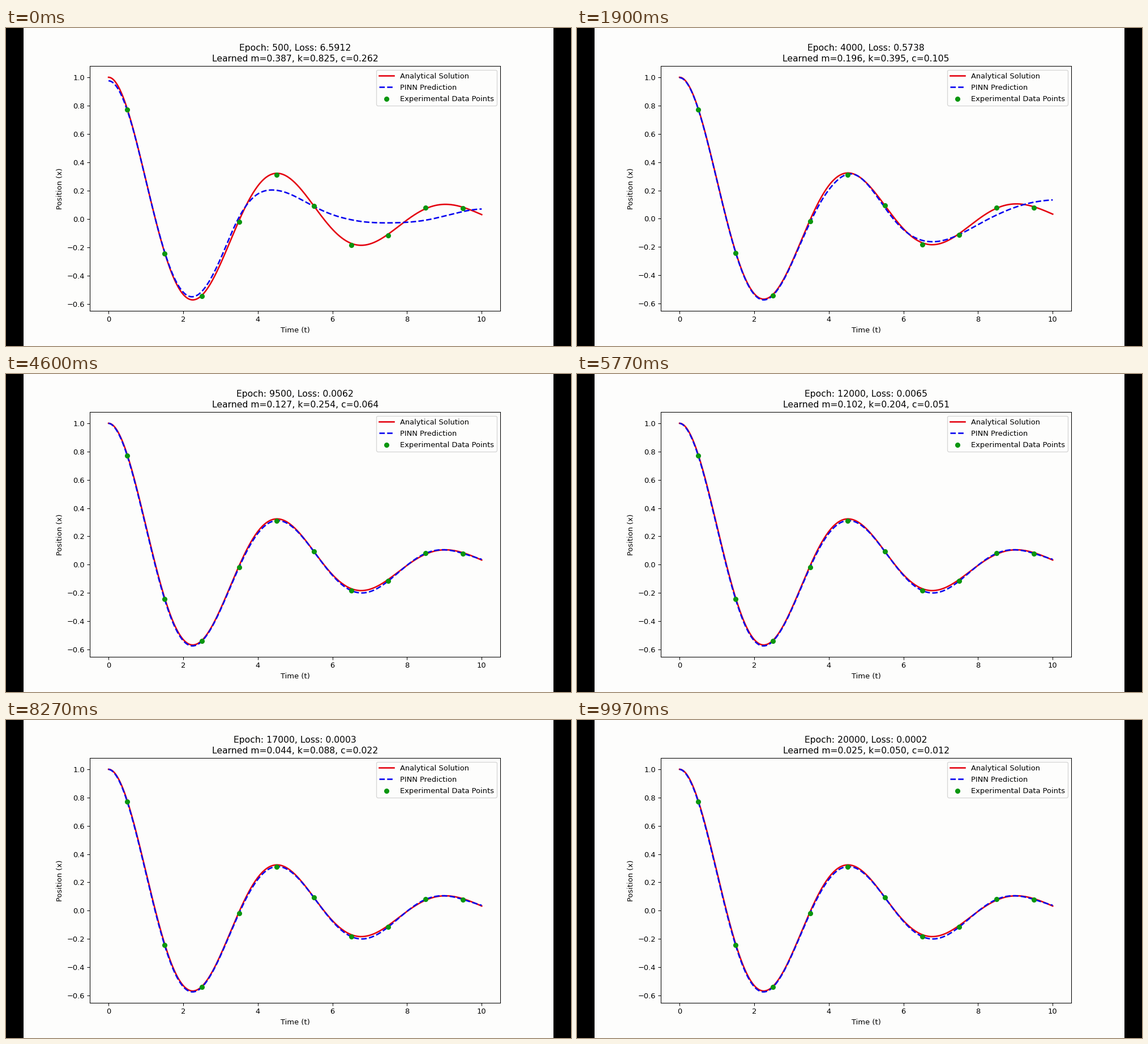
Write a matplotlib script that moves like this. It is 998 px wide and 561 px high and loops after 10 s.

```python
import numpy as np
import matplotlib.pyplot as plt
from matplotlib.animation import FuncAnimation
from matplotlib.patches import Rectangle

W, H, DPI = 998, 561, 93.5
PAGE_X, PAGE_W = 31.2, 935.6
STEPS, STEP_MS = 40, 250
PAGE, RED, BLUE, GREEN = "#fdfdfc", "#e4000f", "#0500f0", "#0a960f"

plt.rcParams["font.family"] = "DejaVu Sans"


def damped(t, decay=0.25, stiffness=2.0):
    """Free oscillation released from x = 1 at rest."""
    w = np.sqrt(stiffness - decay ** 2)
    return np.exp(-decay * t) * (np.cos(w * t) + decay / w * np.sin(w * t))


def bias(t):
    """Small error that remains once the network has converged."""
    ripple = 0.0013 * t * np.cos(2 * np.pi * (t - 5.5) / 2.85)
    return ripple - 0.0085 * (1 - np.exp(-4 * t)) + 0.025 * (t / 10) ** 12


def swing(t, *peaks):
    """Wave that eases from one peak (t, height) to the next."""
    x, y = np.array(peaks).T
    i = np.searchsorted(x, t, side="right") - 1
    u = (t - x[i]) / (x[i + 1] - x[i])
    return y[i] + (y[i + 1] - y[i]) * (1 - np.cos(np.pi * u)) / 2


t = np.linspace(0, 10, 500)
exact = damped(t)
early = swing(t, (0, -.025), (.8, -.003), (3.25, .036), (4.6, -.122),
              (6.65, .17), (8.75, -.09), (10.6, .08))
midway = swing(t, (0, -.003), (3, -.006), (4, -.03), (4.8, 0), (5.6, -.016),
               (6.75, .021), (8.45, -.048), (11, .175))
settled = bias(t)
MID, END = 7, 14


def error(step):
    if step < MID:
        start, goal, u = early, midway, step / MID
    else:
        start, goal, u = midway, settled, min((step - MID) / (END - MID), 1)
    return start + (goal - start) * u * (2 - u)


def decay_through(step, values):
    """Piecewise exponential through the training milestones."""
    return np.exp(np.interp(step, [0, MID, END, 23, 28, 33, 39],
                            np.log(values)))


def training(step):
    loss = decay_through(step, [6.5912, .5738, .006, .0065, .0035, .0003, .0002])
    m = decay_through(step, [.387, .196, .1518, .102, .0692, .044, .0248])
    # k / m and c / m approach their true ratios 2 and 0.5
    off = np.exp(-(step / 5.1) ** 1.5)
    return loss, m, m * (2 + .132 * off ** 1.35), m * (.5 + .177 * off)


fig = plt.figure(figsize=(10.6738, 6), dpi=DPI, facecolor="black")
fig.add_artist(Rectangle((PAGE_X / W, 0), PAGE_W / W, 1, color=PAGE, lw=0,
                         transform=fig.transFigure, zorder=-1))
ax = fig.add_axes([(PAGE_X + 0.125 * PAGE_W) / W, 0.11,
                   0.775 * PAGE_W / W, 0.77], facecolor=PAGE)
ax.plot(t, exact, color=RED, lw=2, label="Analytical Solution")
pred, = ax.plot(t, exact, color=BLUE, lw=2, ls="--", label="PINN Prediction")
data_t = np.arange(0.5, 10)
ax.scatter(data_t, damped(data_t) + bias(data_t), color=GREEN, zorder=3,
           label="Experimental Data Points")
ax.set_xlabel("Time (t)")
ax.set_ylabel("Position (x)")
ax.legend(loc="upper right", facecolor=PAGE, labelspacing=0.53)
title = ax.set_title("", pad=6.6, linespacing=1.3)


def update(step):
    pred.set_ydata(exact + error(step))
    ax.relim()
    ax.autoscale_view()
    loss, m, k, c = training(step)
    title.set_text(f"Epoch: {500 * (step + 1)}, Loss: {loss:.4f}\n"
                   f"Learned m={m:.3f}, k={k:.3f}, c={c:.3f}")
    return pred, title


anim = FuncAnimation(fig, update, frames=STEPS, interval=STEP_MS,
                     init_func=lambda: update(0), repeat=True,
                     repeat_delay=0, blit=False)
plt.show()
```
